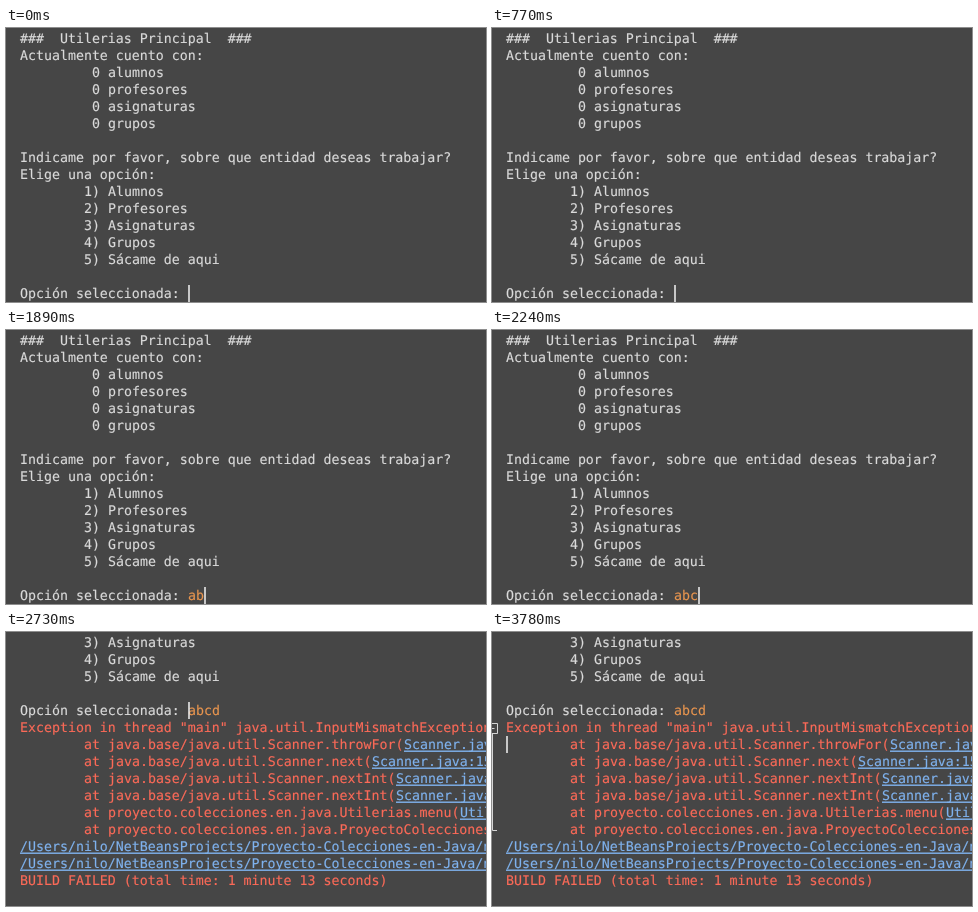
Animation of 480 by 274 pixels, one loop 4200 ms. Source, as an HTML page:

```html
<!DOCTYPE html>
<html lang="es">
<head>
<meta charset="utf-8">
<title>Utilerias</title>
<style>
  html, body { margin: 0; width: 100%; height: 100%; overflow: hidden; background: #464646; }
  svg { display: block; width: 100%; height: 100%; }
  text {
    font-family: "DejaVu Sans Mono", monospace;
    font-size: 13.288px;
    white-space: pre;
    text-rendering: geometricPrecision;
  }
</style>
</head>
<body>
<svg id="stage" viewBox="0 0 480 274">
  <rect width="480" height="274" fill="#464646"/>
  <g id="page"></g>
  <path id="fold" d="M-5 91.5H5.5V101.5H-5M0 96.5H2.5M0.5 102V198.5H5" fill="none" stroke="#d6d6d6"/>
  <rect id="caret" width="1.6" height="17" fill="#e8e8e8"/>
</svg>
<script>
const LOOP = 4200, LEFT = 14, CELL = 8, ROW = 17, BASELINE = 15;
const PLAIN = '#dadada', INPUT = '#e8954f', ERROR = '#fb6a58', LINK = '#7fb2ee';
const PROMPT_ROW = 15, PROMPT_COL = 21, SCROLL_ROWS = 11;

const $ = id => document.getElementById(id);
const page = $('page'), fold = $('fold'), caret = $('caret');

function add(tag, parent, attrs) {
  const el = document.createElementNS('http://www.w3.org/2000/svg', tag);
  for (const key in attrs) el.setAttribute(key, attrs[key]);
  return parent.appendChild(el);
}

function write(parent, row, col, string, fill) {
  const x = LEFT + col * CELL, y = BASELINE + row * ROW;
  const el = add('text', parent, { x, y, fill, stroke: fill, 'stroke-width': 0.15 });
  el.textContent = string;
  if (fill === LINK) add('rect', parent, { x, y: y + 1.5, width: string.length * CELL, height: 1.4, fill });
  return el;
}

[
  [0, '###  Utilerias Principal  ###'],
  [0, 'Actualmente cuento con:'],
  [9, '0 alumnos'],
  [9, '0 profesores'],
  [9, '0 asignaturas'],
  [9, '0 grupos'],
  [0, ''],
  [0, 'Indicame por favor, sobre que entidad deseas trabajar?'],
  [0, 'Elige una opción:'],
  [8, '1) Alumnos'],
  [8, '2) Profesores'],
  [8, '3) Asignaturas'],
  [8, '4) Grupos'],
  [8, '5) Sácame de aqui'],
  [0, ''],
  [0, 'Opción seleccionada:']
].forEach(([col, line], row) => write(page, row, col, line, PLAIN));

const input = write(page, PROMPT_ROW, PROMPT_COL, '', INPUT);

const trace = add('g', page, {});
let row = PROMPT_ROW + 1;
write(trace, row++, 0, 'Exception in thread "main" java.util.InputMismatchException', ERROR);
[
  ['java.base/java.util.Scanner.throwFor', 'Scanner.java:939'],
  ['java.base/java.util.Scanner.next', 'Scanner.java:1594'],
  ['java.base/java.util.Scanner.nextInt', 'Scanner.java:2258'],
  ['java.base/java.util.Scanner.nextInt', 'Scanner.java:2212'],
  ['proyecto.colecciones.en.java.Utilerias.menu', 'Utilerias.java:40'],
  ['proyecto.colecciones.en.java.ProyectoColeccionesEnJava.main', '']
].forEach(([method, place]) => {
  const call = `at ${method}(`;
  write(trace, row, 8, call, ERROR);
  write(trace, row++, 8 + call.length, place, LINK);
});
for (let i = 0; i < 2; i++)
  write(trace, row++, 0, '/Users/nilo/NetBeansProjects/Proyecto-Colecciones-en-Java/nbproject', LINK);
write(trace, row, 0, 'BUILD FAILED (total time: 1 minute 13 seconds)', ERROR);

const KEY_TIMES = [1610, 1890, 2240, 2450];
const within = (t, from, to) => t >= from && t < to;

function render(t) {
  const typed = KEY_TIMES.filter(time => t >= time).length;
  const failed = t >= 2730, folded = t >= 2800;
  input.textContent = 'abcd'.slice(0, typed);
  page.setAttribute('transform', `translate(0 ${failed ? -SCROLL_ROWS * ROW : 0})`);
  trace.style.display = failed ? '' : 'none';
  fold.style.display = folded ? '' : 'none';

  const col = folded ? 0 : PROMPT_COL + (t < 2660 ? typed : 0);
  const caretRow = folded ? 6 : PROMPT_ROW - (failed ? SCROLL_ROWS : 0);
  const hidden = within(t, 280, 770) || within(t, 1330, 1610) || within(t, 3220, 3710);
  caret.setAttribute('x', LEFT + col * CELL + 0.2);
  caret.setAttribute('y', 2 + caretRow * ROW);
  caret.style.display = hidden ? 'none' : '';
}

function tick() {
  render(performance.now() % LOOP);
  requestAnimationFrame(tick);
}
tick();
</script>
</body>
</html>
```
